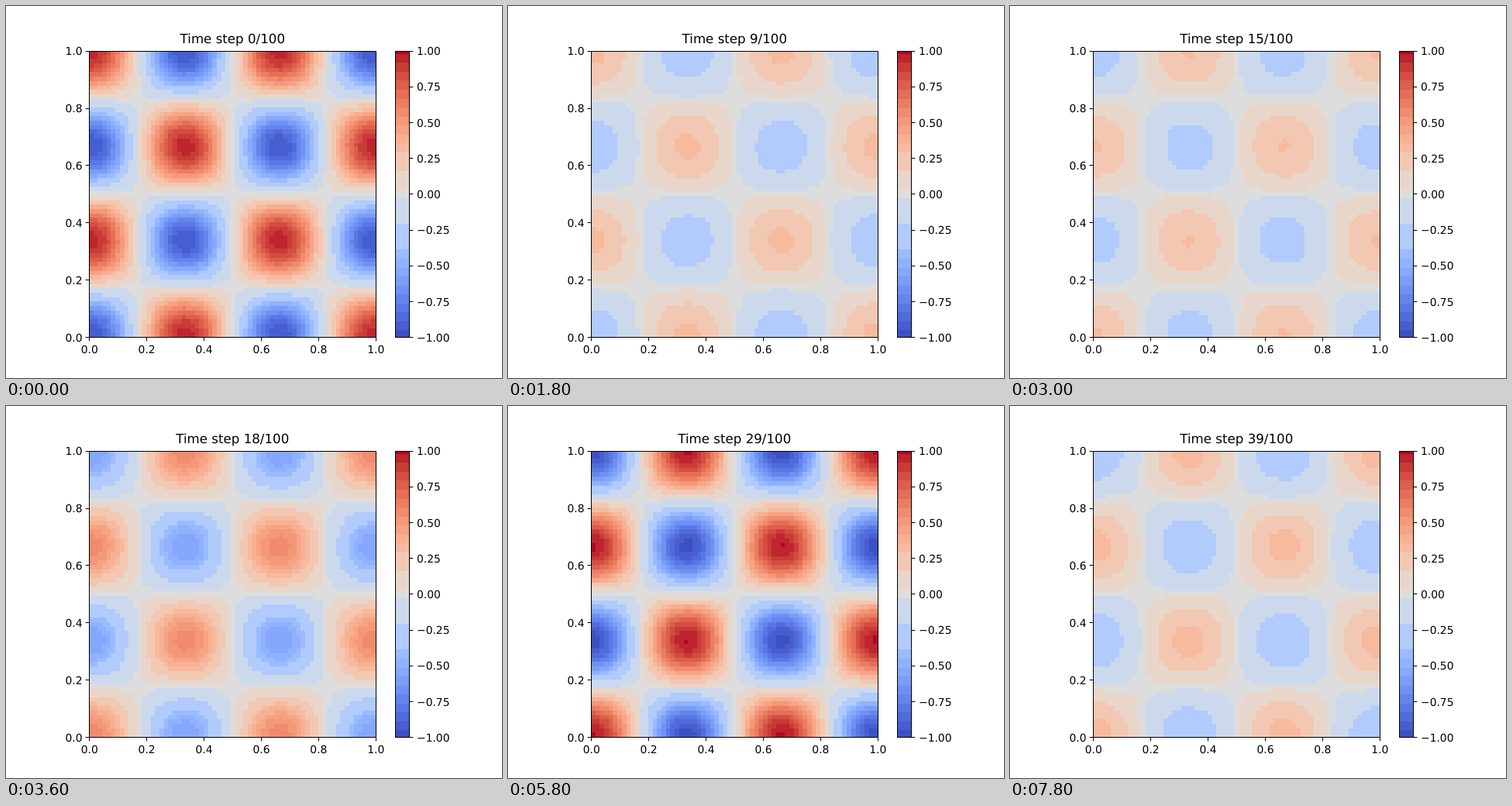
Animation, 640 px wide and 480 px high, one loop 8 s. Source, as an HTML page with a canvas:

```html
<!DOCTYPE html>
<html lang="en">
<head>
<meta charset="utf-8">
<title>Standing wave</title>
<style>
  html, body { margin: 0; width: 100%; height: 100%; overflow: hidden; background: #fff; }
  canvas, svg { position: absolute; left: 0; top: 0; width: 640px; height: 480px; }
  text { font: 13.89px "DejaVu Sans", sans-serif; fill: #000; text-rendering: geometricPrecision; }
  #title { font-size: 16.67px; text-anchor: middle; }
  path { fill: none; stroke: #000; }
</style>
</head>
<body>
<canvas id="field" width="640" height="480"></canvas>
<svg id="axes" viewBox="0 0 640 480"><text id="title" x="292.3" y="48"></text></svg>
<script>
const LEFT = 107.2, TOP = 57.6, SIZE = 369.6, BOTTOM = TOP + SIZE;
const CELLS = 65, STEP_MS = 200, STEPS = 40;
const OMEGA = 0.104, PHASE = 3;

const ctx = document.getElementById('field').getContext('2d');
const axes = document.getElementById('axes');
const title = document.getElementById('title');

function labToRgb(L, a, b) {
  const expand = f => f > 6 / 29 ? f ** 3 : (f - 4 / 29) * 108 / 841;
  const f = (L + 16) / 116;
  const x = 0.9505 * expand(f + a / 500), y = expand(f), z = 1.089 * expand(f - b / 200);
  const gamma = c => 255 * (c > 0.0031308 ? 1.055 * c ** (1 / 2.4) - 0.055 : 12.92 * Math.max(c, 0));
  const rgb = [
    3.2406 * x - 1.5372 * y - 0.4986 * z,
    -0.9689 * x + 1.8758 * y + 0.0415 * z,
    0.0557 * x - 0.204 * y + 1.057 * z
  ];
  return `rgb(${rgb.map(c => Math.round(gamma(c)))})`;
}

// Diverging blue-grey-red scale in polar Lab: magnitude, saturation, hue
function warmth(value) {
  const t = Math.abs(value);
  const magnitude = 88 - 8 * t, saturation = 1.08 * t;
  const hue = value < 0 ? 0.561 * t - 1.661 : 1.061 - 0.561 * t;
  const chroma = magnitude * Math.sin(saturation);
  return labToRgb(magnitude * Math.cos(saturation), chroma * Math.cos(hue), chroma * Math.sin(hue));
}

// Bands: grey around zero, two wide ones per side, then narrow ones
function band(value) {
  const size = Math.abs(value), grey = 0.03, narrow = 0.0625;
  const wide = value < 0 ? 0.18 : 0.13;
  const knee = grey + 2 * wide;
  const centre = (start, width) => start + (Math.floor((size - start) / width) + 0.5) * width;
  if (size < grey) return 0;
  return Math.sign(value) * Math.min(1, size < knee ? centre(grey, wide) : centre(knee, narrow));
}

const color = value => warmth(band(value));
const range = (n, f) => Array.from({ length: n }, (_, i) => f(i));
const wave = range(CELLS, i => Math.cos(3 * Math.PI * i / (CELLS - 1)));
const colEdge = range(CELLS + 1, i => Math.round(107 + 370 * i / CELLS));
const rowEdge = range(CELLS + 1, i => Math.max(58, Math.round(427 - 370 * i / CELLS)));

function drawField(step) {
  const amplitude = -Math.cos(OMEGA * (step + PHASE));
  for (let j = 0; j < CELLS; j++) {
    for (let i = 0; i < CELLS; i++) {
      ctx.fillStyle = color(amplitude * wave[i] * wave[j]);
      ctx.fillRect(colEdge[i], rowEdge[j + 1], colEdge[i + 1] - colEdge[i], rowEdge[j] - rowEdge[j + 1]);
    }
  }
  title.textContent = `Time step ${step}/100`;
}

function drawBar() {
  for (let y = 58; y < 428; y++) {
    ctx.fillStyle = color(1 - 2 * (y + 0.5 - TOP) / SIZE);
    ctx.fillRect(502, y, 19, 1);
  }
}

function add(tag, attrs, content = '') {
  const el = document.createElementNS('http://www.w3.org/2000/svg', tag);
  for (const name in attrs) el.setAttribute(name, attrs[name]);
  el.textContent = content;
  axes.append(el);
}

const line = d => add('path', { d });
const label = (x, y, anchor, content) => add('text', { x, y, 'text-anchor': anchor }, content);
const snap = v => Math.round(v) + 0.5;
const baseline = y => Math.round(y + 5.6);

function drawAxes() {
  line('M107.5 58.5H477.5V427.5H107.5Z');
  line('M502.5 58.5H520.5V427.5H502.5Z');
  for (let k = 0; k <= 5; k++) {
    const x = LEFT + SIZE * k / 5, y = BOTTOM - SIZE * k / 5;
    const name = (k / 5).toFixed(1);
    line(`M${snap(x)} 427.5v4.86`);
    line(`M107.5 ${snap(y)}h-4.86`);
    label(x + 0.5, 448, 'middle', name);
    label(98.5, baseline(y), 'end', name);
  }
  for (let k = -4; k <= 4; k++) {
    const y = TOP + SIZE * (4 - k) / 8;
    line(`M520.5 ${snap(y)}h4.86`);
    label(530, baseline(y), 'start', (k < 0 ? '\u2212' : '') + Math.abs(k / 4).toFixed(2));
  }
}

drawBar();
drawAxes();

let shown = -1;
function tick() {
  const step = Math.floor(performance.now() / STEP_MS) % STEPS;
  if (step !== shown) drawField(shown = step);
  requestAnimationFrame(tick);
}
tick();
</script>
</body>
</html>
```
